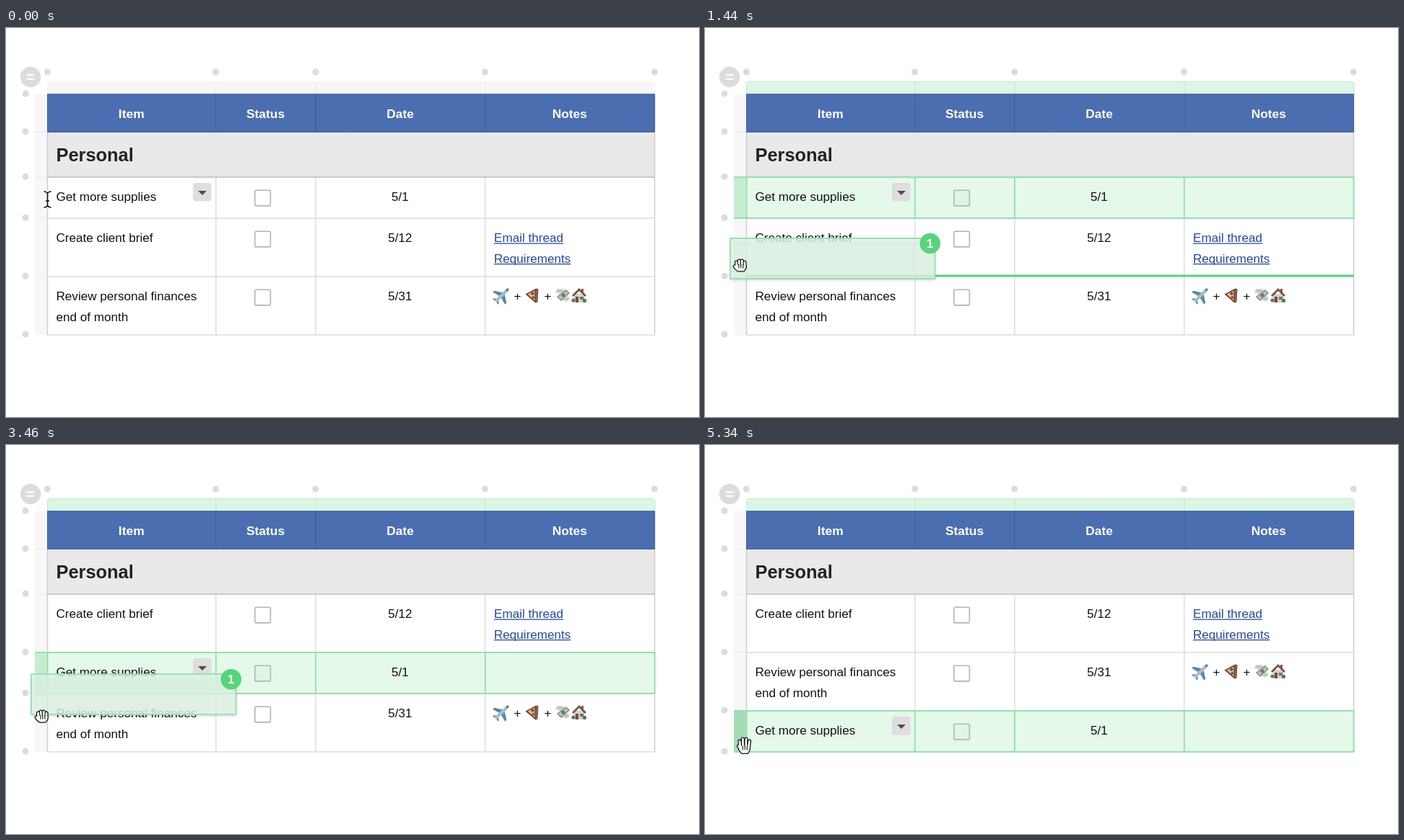
Animation, 960 px wide and 540 px high, one loop 5360 ms. Source, as an HTML page with a canvas:

```html
<!DOCTYPE html>
<html lang="en">
<head>
<meta charset="utf-8">
<title>Reordering table rows</title>
<style>
html, body { margin: 0; width: 100%; height: 100%; overflow: hidden; background: #fff; }
canvas { display: block; }
</style>
</head>
<body>
<canvas id="stage" width="960" height="540"></canvas>
<script>
const ctx = document.getElementById('stage').getContext('2d');
const LOOP = 5360;
const FONT = '"Liberation Sans", Arial, sans-serif';
const COLS = [57.5, 290.8, 429, 663.8, 898.6];
const LEFT = COLS[0], RIGHT = COLS[4], TOP = 207;
const GREEN = '#58d47c', PALE = '#e4f9ea', EDGE = '#96e0ad';

const supplies = { h: 57, lines: ['Get more supplies'], date: '5/1' };
const brief = { h: 81, lines: ['Create client brief'], date: '5/12', links: ['Email thread', 'Requirements'] };
const review = { h: 81, lines: ['Review personal finances', 'end of month'], date: '5/31', icons: true };

const SELECT = 640;
const DRAGS = [
  { grab: 800, start: 1100, end: 1700, open: 1690, line: 344, lineAt: 1290 },
  { grab: 3020, start: 3280, end: 4160, open: 4080, line: 425, lineAt: 3700 }
];
// Keyframes: [time, x, y]
const POINTER = [
  [0, 57.5, 238], [160, 57.5, 238], [400, 49, 238], [900, 49, 238], [1140, 49, 293],
  [1440, 49, 329], [1600, 49, 331], [3160, 49, 331], [3460, 50, 376],
  [3780, 53, 412], [4000, 54.5, 417], [LOOP, 54.5, 417]
];
const GHOST = [
  [1100, 35, 210], [1140, 35, 219], [1440, 35, 292], [1700, 35, 294],
  [3280, 35, 290], [3460, 35, 318], [3780, 39, 383], [4000, 40.5, 389], [4160, 40.5, 389]
];

function at(keys, t) {
  const i = Math.max(1, keys.findIndex(k => k[0] >= t));
  const a = keys[i - 1], b = keys[i];
  const p = Math.min(1, Math.max(0, (t - a[0]) / (b[0] - a[0])));
  return [a[1] + (b[1] - a[1]) * p, a[2] + (b[2] - a[2]) * p];
}

function box(x, y, w, h, color, r = 0) {
  ctx.fillStyle = color;
  ctx.beginPath();
  ctx.roundRect(x, y, w, h, r);
  ctx.fill();
}

function frame(x, y, w, h, color, width, r = 0) {
  ctx.strokeStyle = color;
  ctx.lineWidth = width;
  ctx.beginPath();
  ctx.roundRect(x, y, w, h, r);
  ctx.stroke();
}

function line(x1, y1, x2, y2, color, width = 1.4) {
  ctx.strokeStyle = color;
  ctx.lineWidth = width;
  ctx.beginPath();
  ctx.moveTo(x1, y1);
  ctx.lineTo(x2, y2);
  ctx.stroke();
}

function dot(x, y, r, color) {
  ctx.fillStyle = color;
  ctx.beginPath();
  ctx.arc(x, y, r, 0, Math.PI * 2);
  ctx.fill();
}

function poly(color, ...p) {
  ctx.fillStyle = color;
  ctx.beginPath();
  for (let i = 0; i < p.length; i += 2) ctx.lineTo(p[i], p[i + 1]);
  ctx.closePath();
  ctx.fill();
}

function text(s, x, y, color = '#111', size = 17.1, align = 'left', weight = '') {
  ctx.font = `${weight} ${size}px ${FONT}`;
  ctx.textAlign = align;
  ctx.fillStyle = color;
  ctx.fillText(s, x, y);
}

function icon(x, y, draw) {
  ctx.save();
  ctx.translate(x, y);
  draw();
  ctx.restore();
}

function plane() {
  ctx.rotate(Math.PI / 4);
  poly('#5c87ad', -1, -4, -12, 3, -12, 6, 0, 3, 12, 6, 12, 3, 1, -4);
  poly('#5c87ad', 0, 7, -5, 11, -5, 13, 0, 11.5, 5, 13, 5, 11);
  box(-2.2, -13.5, 4.4, 26, '#a9bdcb', 2.2);
  box(-1.2, -11.5, 2.4, 2, '#3c5064');
}

function pizza() {
  poly('#6b4434', -9, -2, 6, -10, 9, -9, 8, 9, 5, 10);
  poly('#d5b98b', -6, -2, 4, -7, 4, 7);
  dot(1, -3, 2, '#98392f');
  dot(1.8, 2.5, 1.8, '#98392f');
  line(7, -8.5, 6.3, 8.5, '#8d6148', 2.4);
}

function money() {
  poly('#d3d7d4', -10, -4, -8, -9, 1, -9, 4, -4, -2, -1);
  poly('#d3d7d4', 2, 2, 8, 1, 10, 6, 5, 9, 0, 7);
  poly('#7d8e80', -8, 2, 5, -8, 10, -3, -2, 8);
  poly('#b9c5b7', -6, 2, 5, -6, 8, -3, -2, 6);
  dot(1, 0, 2.5, '#68796c');
  line(-7, -6, 0, -6, '#9ba29d', 1);
  line(3, 5, 8, 5, '#9ba29d', 1);
}

function house() {
  box(3, -9, 3, 6, '#8a5b48');
  box(-7, -2, 14, 12, '#d8d0c1');
  poly('#755348', 0, -10, 10, 0, 8, 2, 0, -6, -8, 2, -10, 0);
  box(-5, 2, 4, 8, '#7b4939');
  box(1, 2, 5, 4, '#587b91');
  dot(-8, 7, 2.6, '#5c7c4c');
  dot(7.5, 7.5, 2.7, '#5c7c4c');
}

function chrome(selected) {
  const barColor = selected ? '#dcf6e4' : '#f7f7f7';
  const barEdge = selected ? '#c2eed0' : '#ebebeb';
  box(57, 74, 842.5, 18, barColor, [4, 4, 0, 0]);
  if (selected) frame(57.5, 74.5, 841.5, 18, barEdge, 1, [4, 4, 0, 0]);
  COLS.slice(1, 4).forEach(x => line(x, 74, x, 92, barEdge));
  box(40, 91.5, 17, 335, '#f7f7f7', [4, 0, 0, 4]);
  COLS.forEach(x => dot(x - .2, 61, 4.5, '#dcdcdc'));
  dot(34, 68, 14.3, '#dcdcdc');
  box(28.5, 64.3, 11, 2.2, '#fff');
  box(28.5, 69.7, 11, 2.2, '#fff');
}

function header() {
  box(57, 91.5, 842, 53, '#4a6eb0');
  frame(57.5, 92, 841.2, 52.5, '#3f5f99', 1);
  ['Item', 'Status', 'Date', 'Notes'].forEach((s, i) => {
    if (i) line(COLS[i], 92, COLS[i], 144.5, '#3f5f99', 1.2);
    text(s, (COLS[i] + COLS[i + 1]) / 2 - .4, 125, '#fff', 17.4, 'center', 'bold');
  });
  box(57, 145, 842, 62, '#e9e9e9');
  text('Personal', 69.5, 184.7, '#222', 25.4, 'left', 'bold');
}

function drawRow(row, y) {
  row.lines.forEach((s, i) => text(s, 69.5, y + 33 + i * 28.5));
  frame(344.8, y + 18.3, 21.6, 21.6, '#b4b4b4', 1.6, 2);
  text(row.date, 545.8, y + 33, '#111', 17.1, 'center');
  (row.links || []).forEach((s, i) => {
    const base = y + 33 + i * 28.5;
    text(s, 676, base, '#2546a0');
    line(676, base + 2.2, 676 + ctx.measureText(s).width, base + 2.2, '#2546a0', 1.2);
  });
  if (row.icons) {
    icon(687, y + 26, plane);
    text('+', 708.5, y + 33, '#111', 17.1, 'center');
    icon(728.5, y + 26.5, pizza);
    text('+', 750.5, y + 33, '#111', 17.1, 'center');
    icon(771, y + 26, money);
    icon(794, y + 26, house);
  }
  if (row === supplies) {
    box(259, y + 8, 25.5, 25.5, '#dedede', 4);
    poly('#5a4a46', 266, y + 19, 278, y + 19, 272, y + 25);
  }
}

function drawRows(rows, selected, dragging) {
  const bounds = [92, 144.5, TOP];
  let y = TOP, selectedTop = 0;
  rows.forEach(row => {
    if (row === supplies) selectedTop = y;
    if (row === supplies && selected) {
      box(LEFT, y, RIGHT - LEFT, row.h, PALE);
      box(344.8, y + 18.3, 21.6, 21.6, '#dcf6e4', 2);
      const last = row === rows[2];
      box(40, y, 17.5, row.h, dragging ? '#c6edd2' : '#a2ddb3', [0, 0, 0, last ? 4 : 0]);
    }
    drawRow(row, y);
    y += row.h;
    bounds.push(y);
  });
  COLS.forEach((x, i) => line(x, i % 4 ? TOP : 145, x, y, i % 4 ? '#dcdcdc' : '#cbcbcb'));
  bounds.forEach((b, i) => {
    dot(27, b - .8, 4.5, '#dcdcdc');
    if (i && i < 5) line(40, b, 57, b, '#e9e9e9', 1);
    if (i > 1) line(57, b, 899, b, i === 2 ? '#bebebe' : '#dcdcdc');
  });
  if (!selected) return;
  const bottom = selectedTop + supplies.h;
  for (const b of [selectedTop, bottom]) line(40, b, 899.4, b, EDGE, 1.8);
  COLS.forEach(x => line(x, selectedTop, x, bottom, EDGE, 1.8));
}

function drawGhost(x, y) {
  ctx.save();
  ctx.shadowColor = 'rgba(0,0,0,.22)';
  ctx.shadowBlur = 4;
  ctx.shadowOffsetY = 2;
  box(x, y, 283.5, 56, 'rgba(226,249,233,.8)');
  ctx.restore();
  frame(x, y, 283.5, 56, EDGE, 1.8);
  dot(x + 276.8, y + 7, 14.3, GREEN);
  text('1', x + 276.6, y + 12.8, '#fff', 16.5, 'center', 'bold');
}

function hand(closed) {
  const reach = closed ? [-4, -6, -6, -4] : [-6, -9, -9, -6];
  const path = new Path2D();
  [-5.5, -1.8, 2.2, 6].forEach((x, i) => {
    const spread = closed ? 0 : (i - 1.5) * .7;
    path.moveTo(x, 3);
    path.lineTo(x + spread, reach[i]);
  });
  path.moveTo(-4, 6);
  path.lineTo(-8, closed ? 2 : 1);
  const palm = new Path2D(closed
    ? 'M-5 1L6 1L6 4L4 7L-3 7L-6 4Z'
    : 'M-5 2L6 2L6 5L4 9.5L-3 9.5L-6 5Z');
  ctx.lineCap = ctx.lineJoin = 'round';
  for (const [color, width] of [['#111', 5.2], ['#fff', 2.7]]) {
    ctx.strokeStyle = ctx.fillStyle = color;
    ctx.lineWidth = width;
    ctx.stroke(path);
    ctx.stroke(palm);
    ctx.fill(palm);
  }
  [-2.2, .8, 3.8].forEach(x => line(x, closed ? -1 : 1, x, closed ? 4 : 6, '#222', 1.2));
}

function beam() {
  const path = new Path2D('M-5 -11Q-1 -11 0 -8Q1 -11 5 -11M0 -8V8M-5 11Q-1 11 0 8Q1 11 5 11M-2.5 2H2.5');
  for (const [color, width] of [['#fff', 4], ['#111', 1.7]]) {
    ctx.strokeStyle = color;
    ctx.lineWidth = width;
    ctx.stroke(path);
  }
}

function render(now) {
  const t = now % LOOP;
  const selected = t >= SELECT;
  const drag = DRAGS.find(d => t >= d.start && t < d.end);
  const rows = t < DRAGS[0].end ? [supplies, brief, review]
    : t < DRAGS[1].end ? [brief, supplies, review] : [brief, review, supplies];
  ctx.fillStyle = '#fff';
  ctx.fillRect(0, 0, 960, 540);
  chrome(selected);
  header();
  drawRows(rows, selected, drag);
  if (drag) {
    if (t >= drag.lineAt) line(57, drag.line, 899, drag.line, GREEN, 3);
    drawGhost(...at(GHOST, t));
  }
  const [x, y] = at(POINTER, t);
  const closed = DRAGS.some(d => t >= d.grab && t < d.open);
  icon(x, y, x > 56.5 ? beam : () => hand(closed));
}

const began = performance.now();
function tick() {
  render(performance.now() - began);
  requestAnimationFrame(tick);
}
tick();
</script>
</body>
</html>
```
